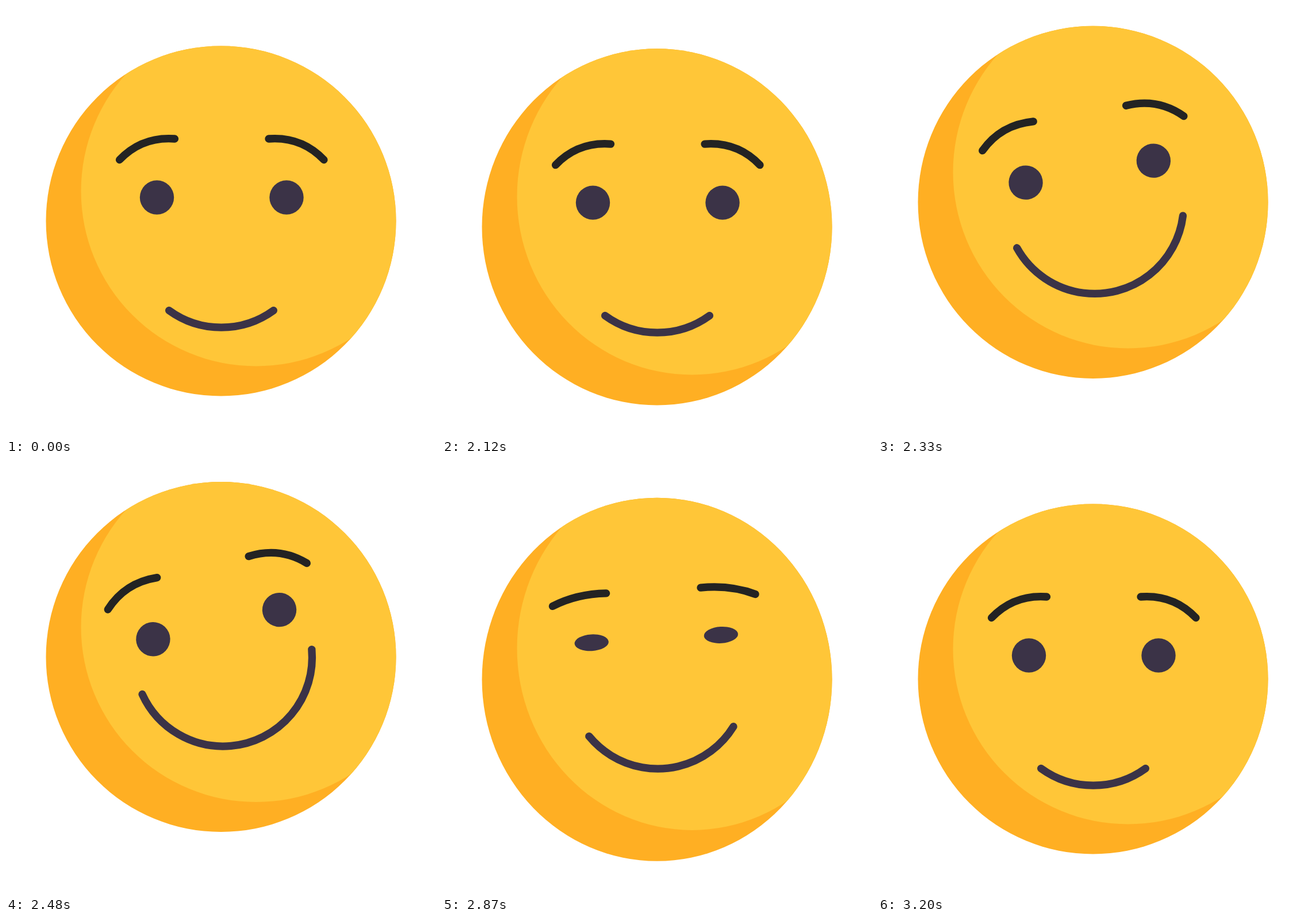
Write an HTML page with a canvas that moves like this. It is 748 by 748 pixels and loops after 3.83 s.

```html
<!DOCTYPE html>
<html lang="en">
<head>
<meta charset="utf-8">
<title>Smiling hop</title>
<style>
  html, body { margin: 0; width: 100%; height: 100%; overflow: hidden; background: #fff; }
  canvas { display: block; width: 748px; height: 748px; }
</style>
</head>
<body>
<canvas id="stage" width="748" height="748"></canvas>
<script>
const ctx = document.getElementById('stage').getContext('2d');
const LOOP = 3830, START = 2000, STEP = 30, LAST = 40, LANDED = 34;
const R = 304.5, MID = 375.25, RAD = Math.PI / 180;
const INK = '#3b3347', BROW = '#232323', LIGHT = '#ffc638', SHADE = '#ffaf23';

const progress = (x, from, to) => Math.min(1, Math.max(0, (x - from) / (to - from)));
const easeOut = (u, power) => 1 - (1 - u) ** power;
const bell = (x, center, width) => Math.exp(-(((x - center) / width) ** 2));
function smooth(x, from, to) {
  const u = progress(x, from, to);
  return u * u * (3 - 2 * u);
}

function disc(x, y, rx, ry, color) {
  ctx.fillStyle = color;
  ctx.beginPath();
  ctx.ellipse(x, y, rx, ry, 0, 0, 2 * Math.PI);
  ctx.fill();
}

// Wind up, leap with a stretch, and land the same way in reverse
function drawHead(k) {
  const hop = Math.max(0, Math.min(k, LANDED - k));
  const rebound = 5 * Math.sin(Math.PI * progress(k, LANDED, LAST));
  const y = 374 + 18 * smooth(hop, 0, 3.3) - 56.5 * easeOut(progress(hop, 3.3, 17), 2.75) - rebound;
  const height = 2 * R + 29.5 * bell(hop, 6.5, 3.2) - 18 * bell(hop, 2.5, 1.3);
  ctx.save();
  ctx.translate(374, y);
  ctx.scale(1, height / (2 * R));
  disc(0, 0, R, R, SHADE);
  ctx.clip();
  disc(61, -52, R, R, LIGHT);
  ctx.restore();
}

function drawEyeAndBrow(blink, angle) {
  disc(-112.75, -42, 29.7, 29.7 * (1 - blink), INK);
  const drop = blink + 0.004 * angle, lift = 0.2 * angle;
  const point = (x, y, dx, dy) => [x + drop * dx, y + drop * dy - lift];
  ctx.strokeStyle = BROW;
  ctx.beginPath();
  ctx.moveTo(...point(-177.75, -107.5, 2, -2));
  ctx.quadraticCurveTo(...point(-138.75, -148.25, 10, 39), ...point(-81.75, -144, -1, 35));
  ctx.stroke();
}

// The features follow the head with a short delay
function drawFace(k) {
  const hop = Math.max(0, Math.min(k, 38 - k));
  const y = 16 * smooth(hop, 1, 6.5) - 71 * easeOut(progress(hop, 6.5, 19), 4.5);
  const angle = 13.1 * smooth(hop, 7, 13);
  const blink = 0.745 * Math.sin(Math.PI * progress(hop, 4.6, 11)) ** 2;
  ctx.lineWidth = 13.3;
  ctx.lineCap = 'round';

  ctx.save();
  ctx.translate(MID, 375 + y);
  ctx.rotate(-angle * RAD);
  drawEyeAndBrow(blink, angle);
  ctx.scale(-1, 1);
  drawEyeAndBrow(blink, angle);
  ctx.restore();

  const middle = 90 - angle * 1.13, half = 36 + 44.3 * smooth(hop, 5.8, 13);
  const mouthY = 404.4 + y - 13.2 * smooth(hop, 9, 11);
  ctx.strokeStyle = INK;
  ctx.beginPath();
  ctx.arc(374.5 + angle * 0.25, mouthY, 154.7, (middle - half) * RAD, (middle + half) * RAD);
  ctx.stroke();
}

const begin = performance.now();
function tick() {
  const t = (performance.now() - begin) % LOOP;
  const k = Math.min(LAST, Math.max(0, Math.floor((t - START) / STEP)));
  ctx.clearRect(0, 0, 748, 748);
  drawHead(k);
  drawFace(k);
  requestAnimationFrame(tick);
}
tick();
</script>
</body>
</html>
```
